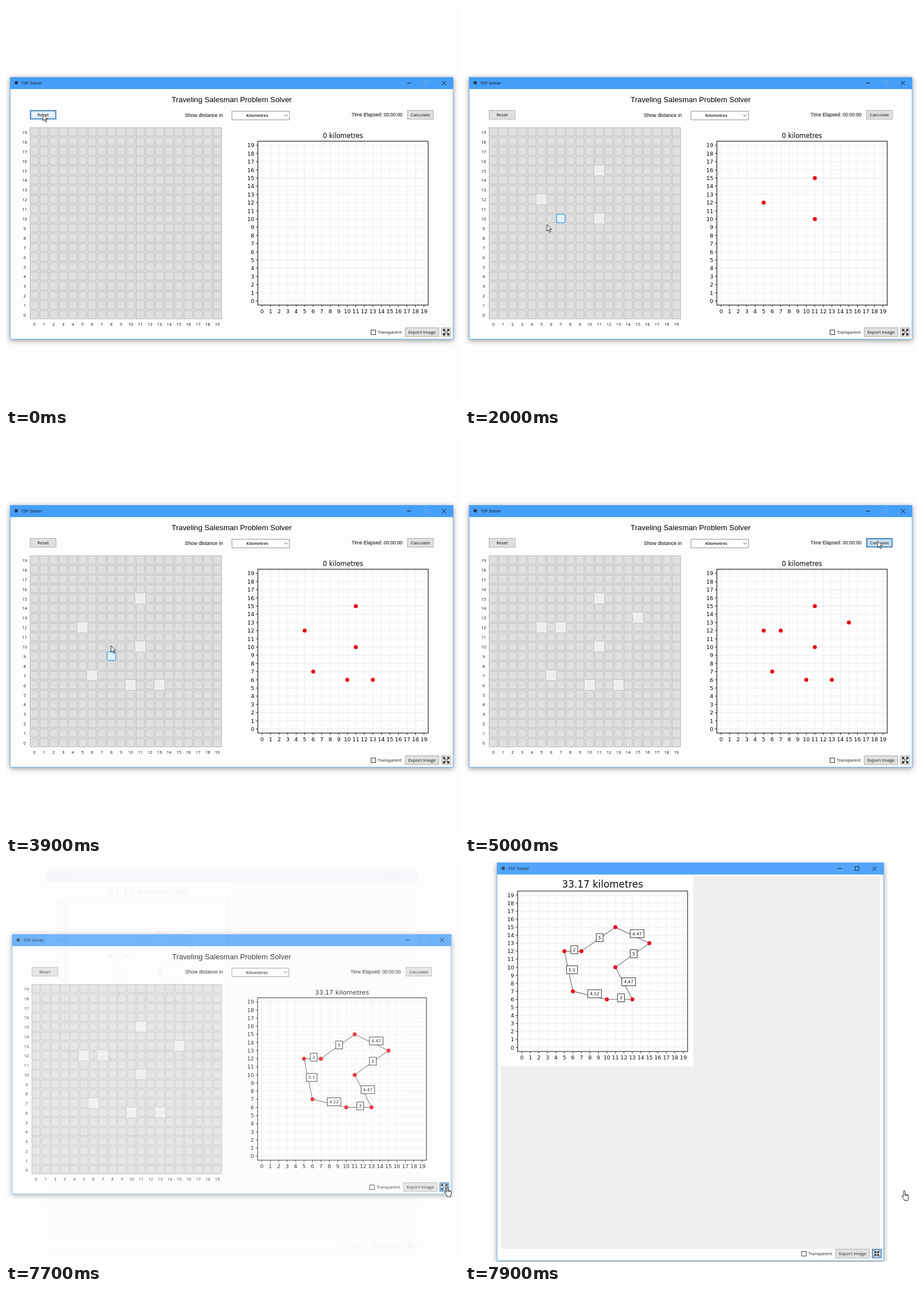
These frames come from a looping animation (796 px wide and 703 px high, 8 s). An HTML page:

```html
<!DOCTYPE html>
<html lang="en">
<head>
<meta charset="utf-8">
<title>TSP Solver</title>
<style>
html, body { margin: 0; width: 100%; height: 100%; overflow: hidden; background: #fefdfe; }
svg { display: block; width: 796px; height: 703px; }
.ui { font-family: "Open Sans", sans-serif; fill: #111; }
.arial { font-family: "Liberation Sans", Arial, sans-serif; fill: #000; }
.plot { font-family: "DejaVu Sans", sans-serif; fill: #000; }
.shadow { filter: drop-shadow(0 2px 5px rgba(0, 0, 0, .42)); }
.cell { fill: #e0dfe0; stroke: #b4b3b4; }
.cell.hover { fill: #e5f1fb; stroke: #0078d7; }
.cell.used { fill: #f0eff0; stroke: #f0eff0; stroke-width: 2.4; }
.btn rect { fill: #e1e0e1; stroke: #adadad; }
.btn .ring { fill: none; stroke: none; stroke-width: .8; }
.btn.hover rect { fill: #e5f1fb; stroke: #0078d7; }
.btn.press rect { fill: #cce4f7; stroke: #005499; }
.btn.focus rect { stroke: #7d7d80; }
.btn.focus.hover rect, .btn.focus.press rect { stroke: #2a72b0; }
.btn.focus .ring { fill: none; stroke: #8a8f96; }
</style>
</head>
<body>
<svg id="stage" viewBox="0 0 796 703" xmlns="http://www.w3.org/2000/svg">
  <g id="main"></g>
  <g id="full"></g>
  <g id="cursor" stroke="#111" stroke-width=".9" stroke-linejoin="round" fill="#fff">
    <path id="arrow" d="M0 0V11.6L2.7 9.1L4.6 13.6L6.5 12.8L4.6 8.5H8.1Z"/>
    <path id="hand" d="M-1.3 9.5V1a1.3 1.3 0 0 1 2.6 0V6l5 1.2q1.4 .4 1.3 2L6.6 14.5V17H-.2V15L-4.2 10.2q-.6-1.6 .9-1.6ZM1.3 6V9M3.6 6.8V9M5.6 7.2V9"/>
  </g>
</svg>
<script>
const LOOP = 8000, STEP = 100, N = 20;
const SOLVED = 5400;
const $ = id => document.getElementById(id);
const range = [...Array(N).keys()];

// Cities in tour order: column, row, time of the click
const tour = [
  [5, 12, 900], [7, 12, 4000], [11, 15, 1500], [15, 13, 4300],
  [11, 10, 1800], [13, 6, 2600], [10, 6, 3500], [6, 7, 2200]
];
const legs = tour.map((a, i) => {
  const b = tour[(i + 1) % tour.length];
  return { a, b, len: Math.hypot(a[0] - b[0], a[1] - b[1]) };
});
const total = legs.reduce((sum, l) => sum + l.len, 0).toFixed(2);

// Pointer path: time, x, y
const path = [
  [300, 65, 190], [900, 134, 336], [1000, 135, 337], [1200, 214, 298],
  [1400, 235, 289], [1600, 237, 288], [1800, 236, 374], [2000, 144, 384],
  [2200, 150, 423], [2300, 152, 424], [2600, 270, 440], [2700, 280, 430],
  [2800, 279, 424], [3000, 281, 419], [3400, 219, 437], [3600, 218, 438],
  [3700, 218, 438], [4000, 168, 339], [4300, 303, 322], [4600, 717, 194],
  [4700, 725, 188], [6300, 725, 188], [6800, 746, 521], [7200, 773, 571],
  [7700, 775, 571], [7900, 772, 578]
];

function pointer(t) {
  const i = path.findIndex(k => k[0] >= t);
  if (i < 0) return path[path.length - 1].slice(1);
  if (!i) return path[0].slice(1);
  const p = path[i - 1], q = path[i], u = (t - p[0]) / (q[0] - p[0]);
  return [p[1] + (q[1] - p[1]) * u, p[2] + (q[2] - p[2]) * u];
}

const text = (x, y, s, size, cls = 'ui', anchor = 'middle', more = '') =>
  `<text x="${x}" y="${y}" font-size="${size}" class="${cls}" text-anchor="${anchor}" ${more}>${s}</text>`;
const rect = (x, y, w, h, more = '') =>
  `<rect x="${x}" y="${y}" width="${w}" height="${h}" ${more}/>`;
const line = (d, color, w = 1) =>
  `<path d="${d}" stroke="${color}" stroke-width="${w}" fill="none"/>`;

function button(id, x, y, w, h, label, size) {
  return `<g id="${id}" class="btn">` + rect(x + .5, y + .5, w - 1, h - 1) +
    rect(x + 1.8, y + 1.8, w - 3.6, h - 3.6, 'class="ring"') +
    (label ? text(x + w / 2, y + h / 2 + 2.9, label, size) : '') + '</g>';
}

// Four diagonal arrows, pointing out or in
function arrows(cx, cy, inward) {
  let d = '';
  for (const sx of [-1, 1]) for (const sy of [-1, 1]) {
    const at = r => `${cx + sx * r} ${cy + sy * r}`;
    const tip = inward ? 1.4 : 4.8, back = inward ? 4.4 : 1.8;
    d += `M${at(inward ? 5 : 1)}L${at(tip)}M${cx + sx * tip} ${cy + sy * back}L${at(tip)}L${cx + sx * back} ${cy + sy * tip}`;
  }
  return line(d, '#111', 1.3);
}

function frame(x, y, w, h, canGrow) {
  const r = x + w, m = y + 10.5;
  return `<g class="shadow">` + rect(x, y, w, h, 'fill="#fefdfe"') + '</g>' +
    rect(x + .5, y + .5, w - 1, h - 1, 'fill="none" stroke="#6fb5fb"') +
    rect(x, y, w, 21, 'fill="#459ffa"') +
    `<circle cx="${x + 11}" cy="${m - .5}" r="3" fill="#27384d"/>` +
    text(x + 20, m + 2.8, 'TSP Solver', 7.6, 'ui', 'start') +
    line(`M${r - 81} ${m}h7`, '#111') +
    rect(r - 50.5, m - 3.5, 6.5, 6.5, `fill="none" stroke="${canGrow ? '#111' : '#6fa9df'}"`) +
    line(`M${r - 20} ${m - 3.5}l7 7m0-7l-7 7`, '#111');
}

function footer(id, right, y, inward) {
  return rect(right - 144.5, y + 4.5, 8, 8, 'fill="#fff" stroke="#333"') +
    text(right - 132.5, y + 11, 'Transparent', 7.4, 'ui', 'start') +
    button('', right - 85, y, 60, 16.5, 'Export Image', 7.75) +
    button(id, right - 21, y, 17, 16.5) + arrows(right - 12.5, y + 8.2, inward);
}

function chart(id, x0, y0, dx, dy, titleY, titleSize) {
  const X = c => x0 + c * dx, Y = r => y0 - r * dy;
  const l = X(-.5), r = X(19.5), top = Y(19.5), bot = Y(-.5);
  let grid = '', ticks = '', labels = '';
  for (const i of range) {
    grid += `M${X(i)} ${top}V${bot}M${l} ${Y(i)}H${r}`;
    ticks += `M${X(i)} ${bot}v3.4M${l} ${Y(i)}h-3.4`;
    labels += text(X(i), bot + 14.2, i, 9.5, 'plot') + text(l - 6.3, Y(i) + 3.5, i, 9.5, 'plot', 'end');
  }
  let edges = '', tags = '', dots = '';
  for (const { a, b, len } of legs) {
    edges += `M${X(a[0])} ${Y(a[1])}L${X(b[0])} ${Y(b[1])}`;
    const mx = (X(a[0]) + X(b[0])) / 2, my = (Y(a[1]) + Y(b[1])) / 2;
    const s = String(+len.toFixed(2));
    const w = 7.5 * (s.includes('.') ? (s.length - 1) * .636 + .318 : .636);
    tags += rect(mx - 3.7, my - 9.7, w + 7.4, 14, 'fill="#fff" fill-opacity=".88" stroke="#222"') +
      text(mx, my, s, 7.5, 'plot', 'start');
  }
  for (const [c, row, at] of tour)
    dots += `<circle class="dot" data-at="${at}" cx="${X(c)}" cy="${Y(row)}" r="3.5" fill="#e4000f"/>`;
  return line(grid, '#ebeaee', .9) + line(ticks, '#111', .9) + labels +
    `<g class="route">${line(edges, '#7d7d7d', 1.4)}</g>` + dots + `<g class="route">${tags}</g>` +
    rect(l, top, r - l, bot - top, 'fill="none" stroke="#111" stroke-width="1.1"') +
    text((l + r) / 2, titleY, `${total} kilometres`, titleSize, 'plot', 'middle', `id="${id}"`);
}

const PX = 16.92, PY = 16.9, GX = 41.7, GY = 551.2;
function cells() {
  let s = '';
  for (const r of range) {
    s += text(32.8, GY - r * PY - 5.2, r, 7.4) + text(GX + (r + .5) * PX - .3, 561.6, r, 7.4);
    for (const c of range)
      s += rect(GX + c * PX + .7, GY - (r + 1) * PY + .7, PX - 2, PY - 2, `class="cell" id="c${c}_${r}"`);
  }
  return s;
}

$('main').innerHTML = frame(7, 125, 779, 461, false) +
  text(396.5, 169, 'Traveling Salesman Problem Solver', 13.25, 'arial') +
  text(314, 195, 'Show distance in', 8.9, 'arial', 'start') +
  text(607.3, 194.3, 'Time Elapsed: 00:00:00', 8.5, 'arial', 'start') +
  rect(397, 185, 101, 15, 'fill="#fff" stroke="#8a8a8a"') +
  text(441.5, 195.2, 'Kilometres', 7.4, 'ui', 'middle', 'font-weight="600"') +
  line('M489.3 191l2.7 2.7l2.7-2.7', '#444') +
  button('reset', 42, 183, 46.5, 16.5, 'Reset', 7.8) +
  button('calc', 705, 183, 46.5, 16.5, 'Calculate', 8) +
  cells() + chart('title', 450, 518.4, 14.97, 14.4, 231.8, 11.4) +
  footer('grow', 786, 565, false);

$('full').innerHTML = frame(56, 1, 680, 700, true) +
  rect(63, 24, 666, 656, 'fill="#f0eff0"') + rect(63, 24, 338, 335, 'fill="#fefdfe"') +
  chart('bigTitle', 100, 326, 14.93, 14.1, 45, 16.9) +
  footer('shrink', 736, 680, true);
$('shrink').classList.add('hover', 'focus');

const dots = [...document.querySelectorAll('.dot')];
const routes = [...document.querySelectorAll('.route')];
let hovered = null;

// Value at time t from steps of [start, value]
const state = (t, steps) => steps.reduce((v, s) => t >= s[0] ? s[1] : v, '');
const show = (el, on) => el.setAttribute('visibility', on ? 'visible' : 'hidden');
const style = (id, s) => $(id).setAttribute('class', 'btn ' + s);
const lerp = (a, b, t, t0, t1) => a + (b - a) * Math.min(1, Math.max(0, (t - t0) / (t1 - t0)));

function place(el, scale, alpha, cx, cy) {
  el.setAttribute('transform', `translate(${cx} ${cy}) scale(${scale}) translate(${-cx} ${-cy})`);
  el.setAttribute('opacity', alpha);
  el.setAttribute('display', alpha > 0 ? 'inline' : 'none');
}

function draw(now) {
  const t = Math.floor(now % LOOP / STEP) * STEP;

  const [x, y] = pointer(t);
  $('cursor').setAttribute('transform', `translate(${x} ${y})`);
  show($('arrow'), t < 7200);
  show($('hand'), t >= 7200);

  if (hovered) hovered.classList.remove('hover');
  const [hx, hy] = pointer(t - 40);
  hovered = $(`c${Math.floor((hx - GX) / PX)}_${Math.floor((GY - hy) / PY)}`);
  if (hovered) hovered.classList.add('hover');
  for (const [c, r, at] of tour) $(`c${c}_${r}`).classList.toggle('used', t >= at);

  for (const d of dots) show(d, t >= +d.dataset.at);
  for (const r of routes) show(r, t >= SOLVED);
  $('title').textContent = (t >= SOLVED ? total : '0') + ' kilometres';

  style('reset', state(t, [[0, 'hover focus'], [400, 'focus'], [900, '']]));
  style('calc', state(t, [[4700, 'hover'], [4900, 'press focus'], [5200, 'hover focus'], [6400, 'focus'], [7500, '']]));
  style('grow', state(t, [[7200, 'hover'], [7500, 'press focus']]));

  const fade = state(t, [[0, 1], [7700, .78], [7800, .32], [7900, 0]]);
  place($('main'), lerp(1, .973, t, 7650, 7800) + (t === 7700 ? 0 : 0), fade, 396.5, 355.5);
  const rise = state(t, [[0, 0], [7700, .04], [7800, .5], [7900, .93]]);
  place($('full'), lerp(.961, 1, t, 7700, 7900), rise, 396, 351);
}

const start = performance.now();
(function tick() {
  draw(performance.now() - start);
  requestAnimationFrame(tick);
})();
</script>
</body>
</html>
```
